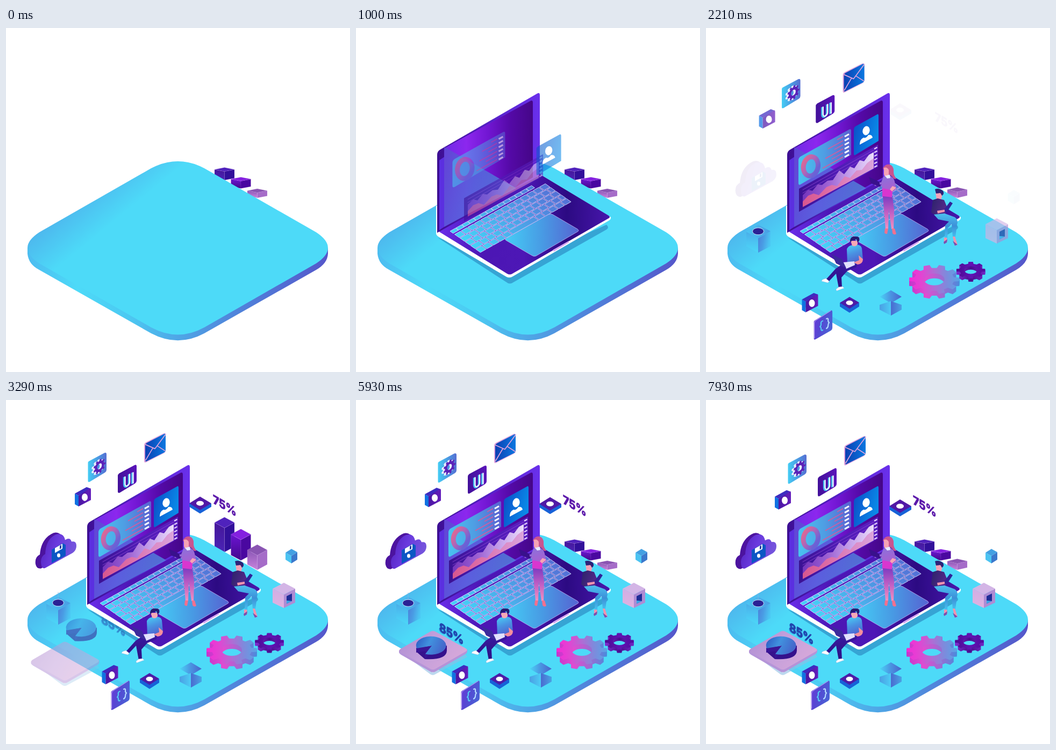
An HTML page for the animation above (8000 ms loop, 640x640 px).

```html
<!DOCTYPE html>
<html lang="en">
<head>
<meta charset="utf-8">
<title>Isometric workspace</title>
<style>
html, body { margin: 0; width: 100%; height: 100%; overflow: hidden; background: #fff; }
svg { display: block; width: 100vw; height: 100vh; }
text { font: 800 22.5px Inter, Roboto, "Liberation Sans", sans-serif; }
.line { fill: none; stroke-linecap: round; stroke-linejoin: round; }
#keys path { fill: url(#keyFill); stroke: #d6dcff; stroke-width: .9; vector-effect: non-scaling-stroke; }
.bar polygon { stroke: #d9a5f0; stroke-opacity: .3; stroke-width: .6; }
</style>
</head>
<body>
<svg viewBox="0 0 640 640">
<defs id="defs">
  <linearGradient id="keyFill" gradientUnits="userSpaceOnUse" x1="0" y1="0" x2="1" y2="0">
    <stop stop-color="#45d4f8"/><stop offset="1" stop-color="#5470d6"/>
  </linearGradient>
  <linearGradient id="floor" gradientUnits="userSpaceOnUse" x1="72" y1="372" x2="118" y2="428">
    <stop stop-color="#4db9ee"/><stop offset="1" stop-color="#4ddaf8"/>
  </linearGradient>
  <path id="slab" d="M270 261Q320 235 369 261L577 380Q621 409 577 438L369 557Q320 584 270 557L62 438Q18 409 62 380Z"/>
</defs>

<g id="bars"></g>
<path d="M40 409V420Q42 440 62 450L270 568Q320 594.500 369 568L577 450Q598 438 599 420V409Z" fill="url(#edge)"/>
<use href="#slab" fill="url(#floor)"/>

<g data-in="0,0,1650">
  <path d="M75 379L97 391V418L75 406Z" fill="url(#cubeL)"/>
  <path d="M120 378L97 391V418L120 406Z" fill="url(#cubeR)"/>
  <path d="M97 366L120 378 97 391 75 379Z" fill="url(#cubeTop)"/>
  <g data-bob="1,300">
    <ellipse cx="97" cy="377.500" rx="10.500" ry="6.500" fill="#2b2295" stroke="#c4e6fd"/>
  </g>
</g>
<path data-in="0,0,2400" data-bob="2,300" class="line" d="M97 358V371" stroke="#86b4e6" stroke-width=".8"/>

<g data-in="-66,40,3050">
  <path d="M102 483L143 507 203 472 207 478 146 511Q142 513 138 510Z" fill="#8fbfe4" opacity=".6"/>
  <path d="M80 466V470Q81 472 84 474L138 505Q143 508 148 505L203 473Q207 471 207 467V464Z" fill="#b594d8"/>
  <path d="M83 463L138 431Q143 428 148 431L204 462Q209 465 204 468L148 500Q143 503 138 500L83 469Q78 466 83 463Z" fill="url(#pieTile)"/>
</g>
<g data-in="0,-66,3050">
  <path d="M112 461V468L128 482Q169 484 169 466V457Z" fill="#35118c"/>
  <path d="M141 457L112 461V470L130 467 128 473V482L141 467Z" fill="#3a1596"/>
  <path d="M141 457L113 462A28 17 0 1 1 129 472.500Z" fill="url(#pie)"/>
</g>
<g data-in="44,-30,3050" stroke-width=".7">
  <text transform="matrix(.866 .5 0 1 154 430.500)" fill="#2f8fdc" stroke="#2f8fdc">85%</text>
  <text transform="matrix(.866 .5 0 1 155 429.500)" fill="#2144ac" stroke="#2144ac">85%</text>
</g>

<g data-in="-125,-72,0,560">
  <path d="M152 390L280 473Q286 478 293 473L466 375Q472 371 466 366L300 440Z" fill="#2378b8" opacity=".55"/>
  <path d="M149 331V382Q149 385 153 388L280 463Q286 466 292 462L471 358Q475 355 474 352L342 272Z" fill="#fff"/>
  <path d="M153 378L281 457Q286 460 291 457L470 354Q474 352 470 349L342 272Z" fill="url(#deck)"/>
  <path d="M151 236Q151 229 157 226L337 122Q342 119 342 125V274L151 381Z" fill="url(#lid)"/>
  <path d="M155 246L164 240V370L155 376Z" fill="#5b2fe0"/>
  <path d="M164 230Q164 224 169 221L324 136Q329 133 329 139V278L164 370Z" fill="url(#screen)"/>
  <path d="M164 221L298 298 164 370Z" fill="url(#sheen)" opacity=".8"/>
  <g id="keys" transform="matrix(170 -95 57 40 175 378)"></g>
  <path d="M280 391L358 347Q362 345 366 347L412 374Q416 377 412 379L335 424Q331 426 327 423L279 395Q276 393 280 391Z" fill="url(#pad)" stroke="#c0b2f2" stroke-width=".8"/>
  <path d="M366 413L396 396V399L368 416Z" fill="#d5a6f2"/>
</g>

<g data-in="16,10,740">
  <path d="M172 246Q172 242 176 239L266 189Q270 187 270 191V236L176 291Q172 293 172 289Z" fill="url(#info)"/>
  <ellipse cx="195" cy="257.500" rx="13.500" ry="18" transform="rotate(12 195 257)" fill="none" stroke="url(#ring)" stroke-width="9"/>
  <g id="infoRows"></g>
</g>
<g data-in="60,38,740">
  <path d="M173 299L320 217V258L173 342Z" fill="url(#chartBack)"/>
  <path d="M180 301L312 227M180 307L312 233" class="line" stroke="#9b4fd8" stroke-width=".7"/>
  <path d="M180 333V311L190 301 198 303 208 291 216 292 226 284 236 283 248 265 257 272 268 258 276 261 286 246 294 248 303 236 312 231V261Z" fill="url(#peakBack)"/>
  <path d="M180 333V323L190 312 200 308 210 311 224 296 234 292 244 294 258 276 268 279 280 265 290 264 300 251 312 242V261Z" fill="url(#peakFront)"/>
  <g id="chartTicks"></g>
</g>
<g data-in="130,80,740">
  <path d="M275 188Q275 185 278 183L318 161Q321 159 321 163V210L278 236Q275 238 275 234Z" fill="url(#card)"/>
  <ellipse cx="298" cy="191" rx="6.500" ry="8.500" transform="rotate(15 298 191)" fill="#fff"/>
  <path d="M286 217Q286 207 293 204Q298 206 302 199Q309 198 310 204Z" fill="#fff"/>
</g>

<g data-in="0,-80,1080">
  <path d="M329 261Q334 252 342 254Q350 257 349 268Q349 274 354 280Q350 283 346 276L333 267Z" fill="#c9558f"/>
  <path d="M331 260Q337 258 340 264V272L343 278H333L331 272Z" fill="#f6a3b5"/>
  <path d="M330 277L341 274Q350 277 352 290L354 299 347 305 329 302 326 291 314 294 313 289 326 287Z" fill="url(#jacket)"/>
  <path d="M333 275L342 273 343 279 337 280Z" fill="#e6ecff"/>
  <path d="M303 277L322 286 325 296 307 289Z" fill="#39118c"/>
  <path d="M328 298L347 302 346 317 328 315Z" fill="#d936cf"/>
  <path d="M329 313L347 315 350 338 349 374H345L340 337 339 374H334L331 338Z" fill="url(#trousers)"/>
  <path d="M333 373H339L337 383Q333 383 332 381ZM346 373H351L354 383Q350 386 347 382Z" fill="#f0718f"/>
  <path d="M342 300L347 294 354 297 346 304Z" fill="#f6a3b5"/>
</g>

<g data-in="-70,40,1080">
  <path d="M262 411Q266 403 275 404Q288 401 290 410L292 430 283 440 263 438Z" fill="url(#shirt)"/>
  <path d="M269 396H282V402Q279 408 272 405Z" fill="#f7a9b4"/>
  <path d="M268 395Q270 386 279 388Q287 387 285 396L282 399 280 393 271 396Q268 401 268 395Z" fill="#261a72"/>
  <path d="M258 436L281 439 280 445 263 452 252 464 253 483 247 484 242 457 229 471 224 467 241 448Z" fill="url(#jeans)"/>
  <path d="M255 436L276 434 277 441 261 448Z" fill="#e2e1ff"/>
  <path d="M234 421L253 430 261 447 242 438Z" fill="#3c2a9c"/>
  <path d="M284 423L292 430Q292 439 282 440L275 436 285 432Z" fill="#f58f9d"/>
  <path d="M217 468L223 466 229 471 227 474 215 471ZM247 482L254 481 257 484 243 489 242 486Z" fill="#fff" stroke="#b9b5e0" stroke-width=".5"/>
</g>

<g data-in="70,40,1080">
  <path d="M427 306H439V314L436 322 429 319Z" fill="#f5a3b8"/>
  <path d="M426 300Q433 297 441 303Q444 309 439 312L436 307 428 308Z" fill="#2c2378"/>
  <path d="M422 320L431 317 443 320 448 332 445 347 428 350 419 343Z" fill="url(#dark)"/>
  <path d="M424 347L444 345 463 352Q470 357 467 366L464 389 459 389 457 365 450 372 449 392H444L445 367 452 360 432 356Z" fill="url(#denim)"/>
  <path d="M442 339L454 323 459 326 448 343Z" fill="#30229a"/>
  <path d="M430 340L444 338 444 342 431 345Z" fill="#f294ae"/>
  <path d="M443 390H448L449 397 443 401ZM459 388H463L468 403 463 405Z" fill="#f294ae"/>
  <path d="M442 398L449 393 448 399 443 402ZM459 396L468 403 463 405Z" fill="#7c4fb0"/>
</g>

<g data-in="100,58,1500" id="bigGear"></g>
<g data-in="71,41,1480" id="smallGear"></g>

<g data-in="0,50,1330">
  <path d="M344 488L364 500 344 512 323 500Z" fill="url(#well)"/>
  <path d="M344 508L323 515V524L344 535Z" fill="url(#wellL)"/>
  <path d="M344 508L364 515V524L344 535Z" fill="url(#wellR)"/>
</g>
<g data-in="58,34,1850">
  <path d="M496 351L517 362V387L496 377Z" fill="url(#pinkL)"/>
  <path d="M538 351L517 362V387L538 377Z" fill="#ad8cd4"/>
  <path d="M517 340L538 351 517 362 496 351Z" fill="#d3b5e6"/>
  <path d="M522 365L532 360V374L522 379Z" fill="#1e2c96"/>
  <path d="M522 373L532 374 522 379Z" fill="#3ca5e8"/>
</g>
<g data-in="43,25,2130">
  <path d="M520 284L531 290V304L520 297Z" fill="#4bc4f2"/>
  <path d="M542 283L531 290V304L542 297Z" fill="#3b78cc"/>
  <path d="M531 277L542 283 531 290 520 284Z" fill="#43a0e2"/>
</g>

<g data-in="-80,-46,1820" data-bob="3.300">
  <g transform="translate(128 165.500)"><use href="#badge"/></g>
</g>
<g data-in="0,50,1330"><g transform="translate(178.500 494)"><use href="#badge"/></g></g>
<g data-in="0,-46,2133" data-bob="3">
  <path d="M341 195V201L361 213.500 382 201V195Z" fill="#1762d8"/>
  <path d="M361 182L382 194.500 361 207 341 194.500Z" fill="#5119a6"/>
  <ellipse cx="361" cy="194.500" rx="7" ry="4.500" fill="#fff"/>
</g>
<g data-in="0,-46,1660">
  <path d="M249 519V526L267 537.500 285 526V519Z" fill="#1762d8"/>
  <path d="M267 508L285 518.500 267 530 249 519Z" fill="#4c1ca8"/>
  <ellipse cx="267" cy="519" rx="6.500" ry="4.200" fill="#fff"/>
</g>
<g data-in="42,-22,2130" data-bob=".8">
  <text transform="matrix(.866 .5 0 1 385 192.500)" fill="#5b18aa" stroke="#5b18aa" stroke-width=".7">75%</text>
</g>

<g data-in="-80,-46,1633" data-bob="2.500,200">
  <path d="M152.500 119Q152 116 155 114.500L183 99.500Q187 98 187 102V131Q187 134 184 136L156 153Q152 155 152.500 151Z" fill="url(#gearTile)"/>
  <g id="iconGear"></g>
</g>
<g data-in="-80,-46,1500" data-bob="3.500">
  <path d="M208 144Q208 141 211 139L239 124Q243 122 243 126V153Q243 156 240 158L212 175Q208 177 208 173Z" fill="url(#uiTile)"/>
  <g fill="none" stroke-width="3.200">
    <path d="M219.500 146V160Q220 166 224.500 163.500Q228.500 161 228.500 156V141M234.500 138V159" stroke="#46c4f0"/>
    <path d="M221.500 145V159Q222 164.500 226 162Q230 160 230 155V140M236.500 137V158" stroke="#eef6ff" stroke-width="2.400"/>
  </g>
</g>
<g data-in="-42,-24,1520" data-bob="3">
  <path d="M257 86Q257 83 260 81L293 64.500Q297 63 297 67V96Q297 99 294 101L261 118Q257 120 257 116Z" fill="#e0a2dc"/>
  <path d="M259 86Q259 84 262 82L294 65.500Q297 64 297 68V96Q297 98 294 100L262 116Q259 118 259 114Z" fill="url(#mail)"/>
  <path d="M259 85L277 93 297 66M260 114L273 92M296 97L282 88" class="line" stroke="#e0a2dc" stroke-width="1.700"/>
</g>
<g data-in="110,64,1500">
  <path d="M195.500 545Q195 542 199 540L226 523Q230 521 230 525V555Q230 558 227 560L199 576Q195 578 195.500 574Z" fill="url(#braceTile)"/>
  <path d="M196.500 574V546Q196 543 200 540.500L227 523" class="line" stroke="#c6b6f6" stroke-width="1"/>
  <g class="line" stroke="#54c8f4" stroke-width="2.200">
    <path d="M212 542Q208 543 209 548Q209 551 207 553Q209 553 209 557Q209 561 212 559"/>
    <path d="M219 538Q223 536 222 541Q222 544 224 545Q222 547 222 551Q222 554 219 556" stroke="#b5dcff"/>
  </g>
</g>

<g data-in="0,0,2110" data-bob="2.500,500">
  <path d="M55 305Q53 292 63 287Q65 260 84 249Q93 243 101 249L74 308 65 313Q57 314 55 305Z" fill="#4c139f"/>
  <path d="M66 308Q62 292 73 286Q74 259 92 250Q107 245 110 260Q119 254 122 263Q131 261 131 271Q131 279 124 284L73 312Q68 314 66 308Z" fill="url(#cloud)"/>
  <path d="M85 278L106 266 111 269V289L85 303Z" fill="#0b57c4"/>
  <path d="M91 275L105 267V276L91 284Z" fill="#fff"/>
  <path d="M100 271L103 269V275L100 277Z" fill="#1a3ca0"/>
  <ellipse cx="98" cy="288.500" rx="3" ry="3.800" fill="#fff"/>
</g>
</svg>

<script>
const $ = id => document.getElementById(id);
const add = (id, markup) => $(id).insertAdjacentHTML('beforeend', markup);

// name: [x2, y2, ...colours], in bounding-box units
const gradients = {
  edge: [1, 0, '#4cbcf0', '#4ddaf8', '#4cc9f2', '#4fa6e6', '#5088dc', '#5270d4', '#5556ca'],
  cubeL: [0, 1, '#4aaee9', '#4cc4f2', '#4cd8f8'], cubeR: [1, .3, '#4a80da', '#4a9ce4', '#4cc6f3'],
  cubeTop: [1, 0, '#4cc6f3', '#4a9ce4'],
  pieTile: [1, .4, '#ae8cd0', '#c39fdb', '#d6a8da'], pie: [1, .3, '#2b57c4', '#4192de', '#4468cc'],
  deck: [1, 0, '#6a2dea', '#4c16b4', '#4d17b6', '#2c0a82', '#4716ac'],
  lid: [1, 0, '#3d0e92', '#5420c6', '#6a30ec'],
  screen: [1, 0, '#6f2be6', '#8c27ee', '#7116d2', '#5409a6', '#450688'],
  sheen: [1, .3, '#6048d2', '#4f6cda', '#5188de'],
  pad: [1, 0, '#45cdf6', '#489be4', '#5664d2'],
  info: [1, 0, '#48c4f0', '#4f9de3', '#5a62d2'], ring: [1, .5, '#e2688f', '#b065b8', '#6a62d6'],
  chartBack: [1, 0, '#3b1193', '#4f1cb6', '#5a20c0'],
  peakBack: [1, 0, '#7434bc', '#9a5ed2', '#c4a0ea', '#eadcfb'],
  peakFront: [1, 0, '#d8568f', '#dc6aa4', '#dc86c2', '#d9a4dc'],
  card: [1, .4, '#0b4cc2', '#0a6ad8', '#0a8ae8'],
  jacket: [.4, 1, '#8576dc', '#a85fd2'], trousers: [0, 1, '#7e3cc0', '#c25fc4', '#f093c0'],
  shirt: [.3, 1, '#4ad2f6', '#4a92e2', '#4d62cf'], jeans: [0, 1, '#3a1aa2', '#2a0f82'],
  dark: [1, .4, '#2a2368', '#54288c'], denim: [0, 1, '#4cc0f0', '#3c90d8', '#48c6f2'],
  bigGear: [1, 0, '#f42bd8', '#e245d2', '#b06cd4', '#7d8bdc', '#58a4e6'],
  bigSide: [1, 0, '#c534cc', '#e14bd0', '#9c6cd2', '#4b8bdc'],
  smallGear: [1, 0, '#4b0a92', '#6212b4', '#520ca0'], smallSide: [1, 0, '#7c2fd0', '#4a0c90', '#7027c4'],
  well: [1, 0, '#4cd4f7', '#4a94e2', '#4a62cc'], wellL: [1, 0, '#4a9ee4', '#4cccf5'],
  wellR: [1, 0, '#4a6ad0', '#4aa2e4'],
  pinkL: [0, 1, '#cfaee4', '#e0b2e0'], gearTile: [1, 0, '#44cdf4', '#4a9ee4', '#566ed2'],
  uiTile: [1, 0, '#42109a', '#5a14ba'], mail: [1, 0, '#0b3fb2', '#0a78e0'],
  braceTile: [1, .4, '#6a36da', '#5548d2', '#4a62d6'], cloud: [1, .3, '#5220bc', '#6a3ade', '#7556dc'],
  badgeFace: [1, 0, '#4a16a2', '#651ebc'],
  bar0: [0, 1, '#45179a', '#4a24b6'], bar1: [0, 1, '#6c14d2', '#42088c'], bar2: [0, 1, '#8b56b6', '#c884dc'],
};
for (const [id, [x2, y2, ...colours]] of Object.entries(gradients)) {
  const stops = colours.map((c, i) => `<stop offset="${i / (colours.length - 1)}" stop-color="${c}"/>`);
  add('defs', `<linearGradient id="${id}${id.endsWith('Gear') ? 'Fill' : ''}" x2="${x2}" y2="${y2}">${stops.join('')}</linearGradient>`);
}

add('defs', `<g id="badge">
  <path d="M0 11L7 15V35L0 31Z" fill="#1072e2"/><path d="M0 11L22 -1 30 2 7 15Z" fill="#3d2bc0"/>
  <path d="M7 15L27 2Q30 0 30 4V23L7 35Z" fill="url(#badgeFace)"/>
  <ellipse cx="18.500" cy="18" rx="5.500" ry="7" fill="#fff"/></g>`);

// Bars: centre x, base y, full height, side colour, top colour
const bars = [[406.5, 283, 65, '#32109a', '#4f22bc'], [437, 298.5, 58.5, '#4a08a0', '#8420e0'], [467.5, 316, 47, '#a56cc8', '#8a55b2']];
bars.forEach(([x, y, h, side, top], i) => add('bars', `<g class="bar">
  <polygon points="${x - 18.5},${y - h + 10} ${x},${y - h + 20} ${x},${y} ${x - 18.5},${y - 10}" fill="url(#bar${i})"/>
  <polygon points="${x + 18.5},${y - h + 10} ${x},${y - h + 20} ${x},${y} ${x + 18.5},${y - 10}" fill="${side}"/>
  <polygon points="${x},${y - h} ${x + 18.5},${y - h + 10} ${x},${y - h + 20} ${x - 18.5},${y - h + 10}" fill="${top}"/></g>`));
const barNodes = [...document.querySelectorAll('.bar')];

// Keyboard in unit coordinates
const key = (u, v, w, h) => add('keys', `<path d="M${u} ${v}h${w}v${h}h${-w}z"/>`);
for (let i = 0; i < 14; i++) key(i * .064, 0, .06, .1);
for (let row = 0; row < 5; row++) {
  const y = .15 + row * .172, shift = row % 2 * .025;
  for (let i = 0; i < 14; i++) {
    if (row === 4 && i > 4 && i < 9) continue;
    const u = i ? i / 14 + shift : 0;
    key(u, y, (i < 13 ? (i + 1) / 14 + shift : 1) - u - .008, .152);
  }
}
key(5 / 14, .838, 4 / 14 - .008, .152);

for (let i = 0; i < 6; i++) {
  const y = 202 + i * 7.6, start = 244 - (i * 17) % 29;
  add('infoRows', `<path d="M258 ${y}l8-4.500" stroke="#fff" stroke-width="3"/>
    <path d="M${start} ${y + (258 - start) * .56 - 2}L255 ${y}" stroke="#d65c9c" stroke-width="1.600"/>`);
  add('chartTicks', `<path d="M313 ${225 + i * 6.8}l5.500-3" stroke="#e8d8ff" stroke-width="2.200"/>`);
}

const gearPath = (teeth, outer, inner, hole) => {
  const points = [];
  for (let i = 0; i < teeth; i++)
    for (const [offset, r] of [[-.30, inner], [-.20, outer], [.20, outer], [.30, inner]]) {
      const a = (i + offset) / teeth * 2 * Math.PI;
      points.push((r * Math.cos(a)).toFixed(2) + ' ' + (r * Math.sin(a)).toFixed(2));
    }
  return `M${points.join('L')}ZM${hole} 0A${hole} ${hole} 0 1 0 ${-hole} 0A${hole} ${hole} 0 1 0 ${hole} 0Z`;
};
const gear = (id, shape, matrix, depth, step, side, fill) => {
  for (let i = depth; i >= 0; i--)
    add(id, `<g transform="translate(${step[0] * i} ${step[1] * i})"><path transform="matrix(${matrix})" d="${shape}" fill-rule="evenodd" fill="${i ? side : fill}"/></g>`);
};
gear('bigGear', gearPath(10, 47, 37, 19), '1 0 0 .58 420 465', 9, [0, 1], 'url(#bigSide)', 'url(#bigGearFill)');
gear('smallGear', gearPath(8, 27, 21, 12), '1 0 0 .58 490 449', 6, [0, 1], 'url(#smallSide)', 'url(#smallGearFill)');
gear('iconGear', gearPath(9, 13, 10, 5), '.866 -.5 0 1 174 124.500', 4, [-1, .4], '#e8f0ff', '#5b22b8');

const LOOP = 8000, STEP = LOOP / 112, BOB = 2860, CYCLE = 5760;
const clamp = x => Math.max(0, Math.min(1, x));
const easeOut = x => 1 - (1 - x) ** 2;
const easeInOut = x => x < .5 ? 4 * x ** 3 : 1 - 4 * (1 - x) ** 3;
const numbers = text => text ? text.split(',').map(Number) : [];
const parts = [...document.querySelectorAll('[data-in],[data-bob]')].map(node => ({
  node, entry: numbers(node.dataset.in), bob: numbers(node.dataset.bob),
}));

function draw(t) {
  for (const { node, entry: [dx = 0, dy = 0, start = -LOOP, length = 820], bob: [amp = 0, lag = 0] } of parts) {
    const x = clamp((t - start) / length), left = 1 - easeOut(x);
    const sway = -amp * Math.cos(2 * Math.PI * (t - 3590 - lag) / BOB);
    node.setAttribute('transform', `translate(${dx * left} ${dy * left + sway})`);
    node.setAttribute('opacity', Math.min(1, x * 1.8));
  }
  barNodes.forEach((node, i) => {
    const rise = [2450, 2200, 1920][i], fall = [4980, 5060, 5130][i];
    const step = start => easeInOut(clamp((t - start) / 800));
    const scale = .36 + .64 * (step(rise) - step(fall) + step(rise + CYCLE));
    const base = bars[i][1];
    node.setAttribute('transform', `translate(0 ${base * (1 - scale)}) scale(1 ${scale})`);
  });
}

// Motion advances at 14 pictures per second
const origin = performance.now();
function tick() {
  const t = (performance.now() - origin) % LOOP;
  draw(Math.floor(t / STEP) * STEP);
  requestAnimationFrame(tick);
}
draw(0);
requestAnimationFrame(tick);
</script>
</body>
</html>
```
